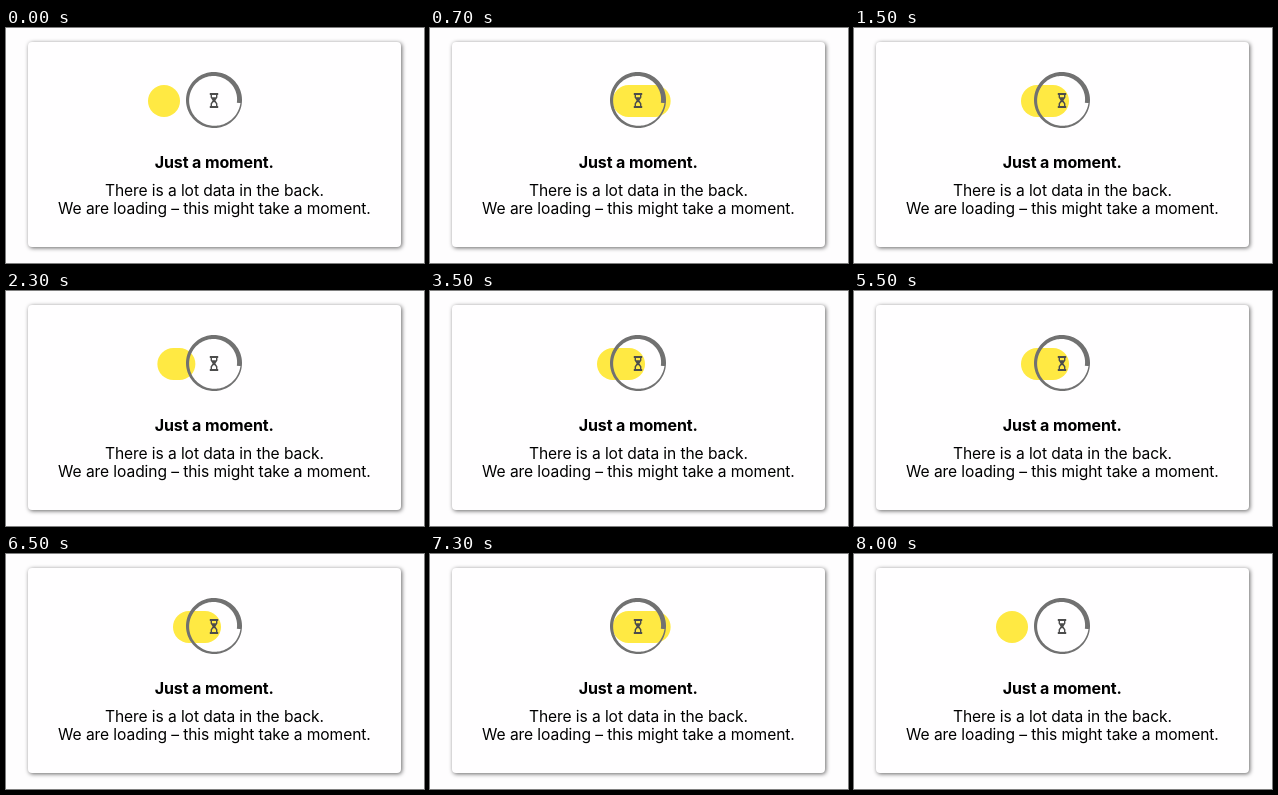
Recreate the animation shown at these times as an HTML page. Size 418 px wide and 235 px high, loop 8100 ms.

```html
<!DOCTYPE html>
<html lang="en">
<head>
<meta charset="utf-8">
<title>Just a moment</title>
<style>
  html, body { margin: 0; width: 100%; height: 100%; overflow: hidden; background: #fefdfe; }
  .card {
    position: absolute; left: 22px; top: 14px; width: 373px; height: 205px;
    border-radius: 4px; background: #fffeff; box-shadow: 1px 1px 4px rgba(0, 0, 0, .6);
  }
  svg { position: absolute; left: 0; top: 0; }
  text { font: 15.6px Inter, "Liberation Sans", sans-serif; letter-spacing: -.09px; text-anchor: middle; }
  .title { font-size: 16px; font-weight: 700; letter-spacing: -.12px; }
</style>
</head>
<body>
<div class="card"></div>
<svg width="418" height="235" viewBox="0 0 418 235">
  <rect id="blob" x="142" y="57" width="32" height="32" rx="16" fill="#ffe943"/>
  <path id="ring" fill="#717171"/>
  <path fill="#4c4c4c" fill-rule="evenodd" d="M203.8 65h8.4v2h-.8v2.500l-2 3 2 3V78h.8v2h-8.4v-2h.8v-2.500l2-3-2-3V67h-.8z
    M206 67v2.300h4V67z M206 78v-2l1.200-1.800h1.600L210 76v2z"/>
  <text class="title" x="208.3" y="140">Just a moment.</text>
  <text x="208.4" y="168">There is a lot data in the back.</text>
  <text x="208.4" y="186">We are loading – this might take a moment.</text>
</svg>
<script>
  const LOOP = 8100, STEP = 100, SWEEP = 1000;
  const blob = document.getElementById('blob');

  // Ring that tapers counter-clockwise from a blunt end at three o'clock
  const outer = [], inner = [];
  for (let i = 0; i <= 120; i++) {
    const k = i / 120, a = 0.12 - k * 2 * Math.PI;
    const point = r => (208 + r * Math.cos(a)).toFixed(2) + ' ' + (72 + r * Math.sin(a)).toFixed(2);
    outer.push(point(28));
    inner.unshift(point(23 + 3.6 * k));
  }
  document.getElementById('ring').setAttribute('d', 'M' + outer.concat(inner).join('L') + 'Z');

  // cubic-bezier(.42, 0, .58, 1)
  function easeInOut(x) {
    let lo = 0, hi = 1;
    for (let i = 0; i < 24; i++) {
      const s = (lo + hi) / 2, q = 1 - s;
      if (1.26 * q * q * s + 1.74 * q * s * s + s * s * s < x) lo = s; else hi = s;
    }
    return lo * lo * (3 - 2 * lo);
  }

  function draw(now) {
    const t = Math.floor(now % LOOP / STEP) * STEP;
    const phase = t / SWEEP % 2;
    const e = easeInOut(phase < 1 ? phase : 2 - phase);
    blob.setAttribute('x', 142 + 50 * e);
    blob.setAttribute('width', 32 + 32 * e);
    requestAnimationFrame(() => draw(performance.now()));
  }
  draw(performance.now());
</script>
</body>
</html>
```
